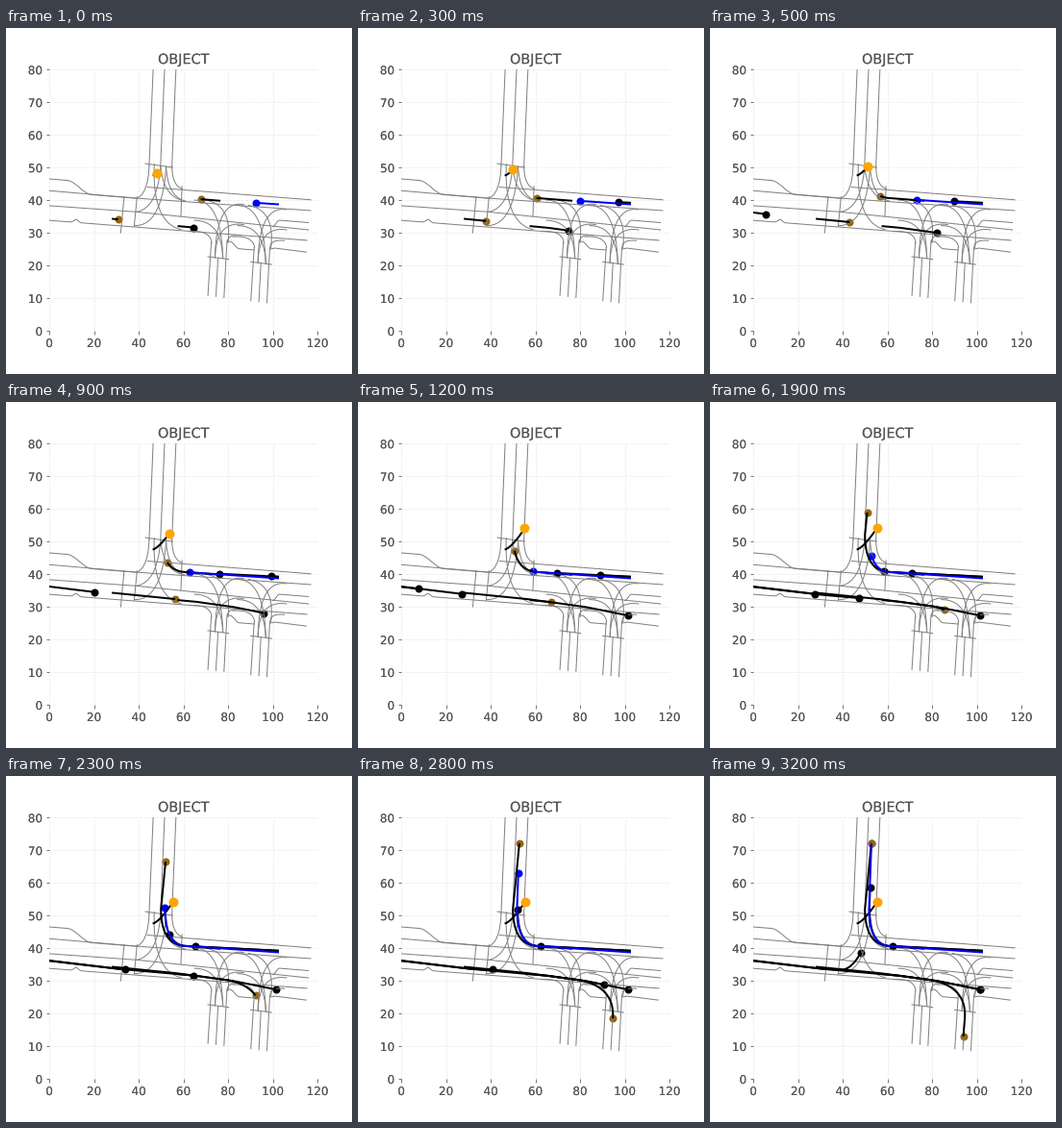
These frames come from a looping animation (360 by 360 pixels, 3.3 s). A matplotlib script:

```python
import numpy as np
import matplotlib.pyplot as plt
import matplotlib.patheffects as pe
from matplotlib.animation import FuncAnimation

FRAMES, STEP_MS = 33, 100
INK, ROAD, BROWN = "#555555", "#808080", "#96650f"

plt.rcParams.update({
    "font.family": "DejaVu Sans", "font.size": 12,
    "text.color": INK, "xtick.color": INK, "ytick.color": INK,
})

fig = plt.figure(figsize=(5, 5), dpi=72, facecolor="white")
ax = fig.add_axes([0.125, 0.125, 0.775, 0.755])
ax.set(xlim=(0, 120), ylim=(0, 80))
ax.set_xticks(range(0, 121, 20))
ax.set_yticks(range(0, 81, 10))
title = ax.set_title("OBJECT", fontsize=14.4, pad=6)
ax.set_axisbelow(True)
ax.grid(color="#ebebeb", linestyle="--", linewidth=0.8)
ax.tick_params(length=3.5, width=0.8, pad=3.5)
for spine in ax.spines.values():
    spine.set_visible(False)

# lettering is printed twice, slightly apart
double = [pe.Normal(), pe.Normal(offset=(-1.5, 0))]
for text in [title, *ax.get_xticklabels(), *ax.get_yticklabels()]:
    text.set_path_effects(double)


def bezier(a, b, c):
    """Quadratic curve from a to c, pulled towards b."""
    s = np.linspace(0, 1, 30)[:, None]
    a, b, c = map(np.array, (a, b, c))
    return (1 - s) ** 2 * a + 2 * s * (1 - s) * b + s ** 2 * c


def smooth(x, lo, hi):
    s = np.clip((x - lo) / (hi - lo), 0, 1)
    return s * s * (3 - 2 * s)


def road(*pts):
    ax.plot(*zip(*pts), color=ROAD, lw=1, zorder=2)


def bend(a, b, c):
    road(*bezier(a, b, c))


def draw_lanes():
    road((0, 42.9), (39, 40.6), (117, 36.8))
    road((0, 38.3), (39, 36.4), (116, 30.9))
    road((44, 44), (117, 40.1))
    road((98.8, 25), (101, 25.3), (115, 24.1))

    # a lane merging from the left, a kerb bump, two openings on the right
    x = np.linspace(0, 39, 80)
    road(*zip(x, 46.5 - 0.055 * x - 3.8 * smooth(x, 8, 19)))
    x = np.linspace(0, 115.3, 240)
    bump = 0.9 * np.exp(-((x - 12) / 1.3) ** 2)
    road(*zip(x, 33.8 - 0.053 * x + bump))
    x = np.linspace(100, 116, 40)
    road(*zip(x, 31.9 - 0.055 * (x - 100) + 2.1 * smooth(x, 100, 103)))
    x = np.linspace(79.5, 91.8, 40)
    road(*zip(x, 27.4 - 0.055 * (x - 79.5) - 2 * smooth(x, 81, 85)))

    # stop lines
    road((33.5, 41), (32, 30))
    road((39.3, 41), (38, 32))
    road((59.4, 44.2), (58.9, 35))
    road((43, 51.2), (55.2, 50))


def draw_north_arm():
    left, mid, right = [(44.7 + 5.1 * k, 50.5) for k in range(3)]
    for x, y in (left, mid, right):
        road((x + 1.8, 80), (x, y))
    bend(left, (44.2, 42), (39.2, 40.6))
    bend(right, (55, 44.5), (59.4, 43.5))
    bend(mid, (48.5, 37.5), (39, 36.4))
    bend(mid, (51, 41.5), (59.2, 40))
    bend((47, 51), (46, 33), (59, 31))
    bend((52.3, 50.3), (53, 41), (61, 39.7))
    bend((52.3, 50.3), (50.5, 32), (38.2, 32.2))


def draw_south_arm(x, y):
    for k in range(3):
        top = 22.3 if k == 1 else 27
        road((x + 3.5 * k + 0.1 * top - 1.2, y + top),
             (x + 3.6 * k, y + 10.8 - 0.3 * k))
    road((x, y + 22.7), (x + 9.3, y + 21.9))
    # lanes swing in from the left and the right
    for lane in (40, 33.8):
        bend((x - 6, y + lane), (x + 6, y + lane), (x + 6.7, y + 22.2))
        bend((x + 16, y + lane - 1.3), (x + 3.6, y + lane),
             (x + 3.2, y + 22.4))
    bend((x - 8, y + 30.4), (x + 1, y + 30.8), (x + 1.7, y + 27))
    bend((x + 8.7, y + 27), (x + 8.5, y + 29.6), (x + 15, y + 29.2))
    bend((x - 1, y + 40), (x + 11, y + 38.5), (x + 9, y + 27))


class Agent:
    """Follows a route; keys are (time, distance) pairs in frames."""

    def __init__(self, route, keys, color="black", trail="black",
                 size=8, line_z=4, dot_z=1.5):
        self.route = np.vstack(route)
        steps = np.hypot(*np.diff(self.route, axis=0).T)
        self.dist = np.r_[0, np.cumsum(steps)]
        self.t, self.d = np.array(keys, float).T
        self.line, = ax.plot([], [], color=trail, lw=2, zorder=line_z,
                             solid_capstyle="butt")
        self.dot, = ax.plot([], [], "o", ms=size, color=color, mew=0,
                            zorder=dot_z)

    def travelled(self, now):
        t, d = self.t, self.d
        i = np.clip(np.searchsorted(t, now) - 1, 0, len(t) - 2)
        h = t[i + 1] - t[i]
        s = (now - t[i]) / h
        v = np.gradient(d, t) * h
        return (d[i] + s * s * (3 - 2 * s) * (d[i + 1] - d[i])
                + s * (1 - s) ** 2 * v[i] - s * s * (1 - s) * v[i + 1])

    def show(self, now):
        if now < self.t[0]:
            self.line.set_data([], [])
            self.dot.set_data([], [])
            return
        end = self.travelled(min(now, self.t[-1]))
        d = np.linspace(self.d[0], end, 150)
        x, y = (np.interp(d, self.dist, axis) for axis in self.route.T)
        self.line.set_data(x, y)
        self.dot.set_data(x[-1:], y[-1:])


def north_turn(start, x):
    """Westbound lane, then a right turn into the north arm."""
    return [start, bezier((62, 40.6), (x, 40.5), (x, 52)), (52.9, 72.4)]


draw_lanes()
draw_north_arm()
draw_south_arm(71, 0)
draw_south_arm(90.2, -1.6)

east = [(0, 36.2), (30, 33.7), (65, 31.6), (82, 30), (101.7, 27.3)]
left_turn = [(0, 36.1), (30, 33.7), bezier((39, 33.3), (44, 33.4), (48, 38.5))]
right_turn = [(28, 34.3), (56, 32.4),
              bezier((80, 30.2), (95.5, 28), (94.7, 18.7)), (94, 12.9)]
crossing = [bezier((46.3, 47.5), (49.8, 48.3), (55.5, 54.3))]
entry = (102.8, 39.2)

agents = [
    Agent(east, [(-2, 57.6), (10.6, 102)]),
    Agent(east, [(3.6, 0), (9, 20.5), (15, 33.5), (23, 64.7), (30, 102)]),
    Agent(left_turn, [(10, 0), (15, 18.5), (23, 33.9), (28, 41), (32, 50)]),
    Agent(north_turn(entry, 52),
          [(1.5, 0), (9, 26.5), (15, 38.5), (23, 50), (32, 64.8)]),
    Agent(north_turn(entry, 52), [(8, 0), (15, 23), (23, 37.3), (28, 40.3)]),
    Agent(north_turn((102.8, 38.7), 51.8),
          [(-2.4, 0), (5, 29.8), (10, 41.8), (15, 46.5), (23, 58.8),
           (32, 78.5)], "blue", "blue", line_z=5),
    Agent(right_turn,
          [(-1.2, 0), (5, 15.2), (15, 48.6), (23, 65.5), (32, 78.8)], BROWN),
    Agent(north_turn((76.6, 39.8), 50),
          [(-3.5, 0), (5, 19.8), (9, 24.5), (15, 33.5), (26, 54)], BROWN),
    Agent(crossing, [(-2.5, 0), (13, 12)], "orange", size=10, dot_z=6),
]


def update(frame):
    for agent in agents:
        agent.show(frame)
    return []


anim = FuncAnimation(fig, update, frames=FRAMES, interval=STEP_MS,
                     repeat=True, repeat_delay=0)
plt.show()
```
